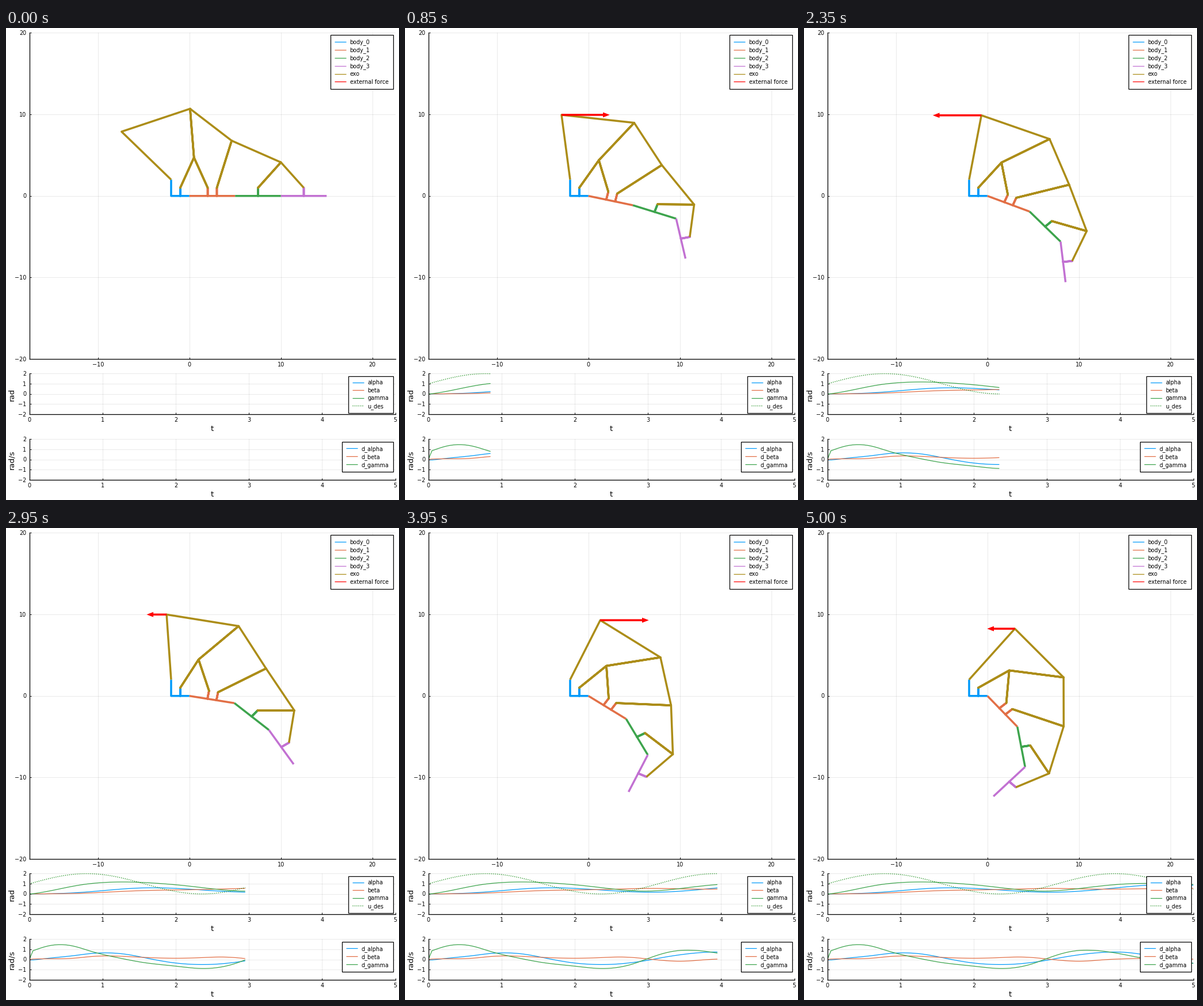
Write a matplotlib script that moves like this. It is 683 px wide and 820 px high and loops after 5.05 s.

```python
import numpy as np
import matplotlib.pyplot as plt
from matplotlib.animation import FuncAnimation
from matplotlib.patches import Polygon, Rectangle

W, H, DPI = 683, 820, 100
PT = 72 / DPI                     # points per pixel
BLUE, ORANGE, GREEN, PURPLE, GOLD = "#009afa", "#e26f46", "#3da44d", "#c271d2", "#ac8d18"
DOTS = (0, (1, 1.7))
THIN, THICK = 1.25 * PT, 3.5 * PT
STEP, COUNT = 0.05, 101
time = np.arange(COUNT) * STEP


# ---------- motion ----------

def spline(x, y, at):
    """Natural cubic spline through (x, y), evaluated at `at`."""
    x, y = np.asarray(x, float), np.asarray(y, float)
    n, h = len(x), np.diff(x)
    m, rhs = np.eye(n), np.zeros(n)
    for i in range(1, n - 1):
        m[i, i - 1:i + 2] = h[i - 1], 2 * (h[i - 1] + h[i]), h[i]
        rhs[i] = 6 * ((y[i + 1] - y[i]) / h[i] - (y[i] - y[i - 1]) / h[i - 1])
    k = np.linalg.solve(m, rhs)
    i = np.clip(np.searchsorted(x, at) - 1, 0, n - 2)
    a, b, w = x[i + 1] - at, at - x[i], h[i]
    return ((k[i] * a**3 + k[i + 1] * b**3) / (6 * w)
            + (y[i] / w - k[i] * w / 6) * a + (y[i + 1] / w - k[i + 1] * w / 6) * b)


knots = [.05, .25, .4, .6, .85, 1.05, 1.3, 1.55, 1.8, 2.05, 2.35,
         2.6, 2.8, 3, 3.2, 3.4, 3.55, 3.8, 4.05, 4.35, 4.7, 5]
rates = [
    [-.04, .12, .23, .38, .60, .66, .54, .22, -.13, -.38, -.49,
     -.43, -.28, -.07, .20, .43, .57, .72, .72, .45, -.03, -.37],
    [.05, .08, .08, .13, .30, .36, .31, .22, .15, .13, .19,
     .25, .20, .06, -.08, -.16, -.14, -.01, .07, .12, .10, .04],
    [.87, 1.33, 1.47, 1.33, .80, .43, .05, -.28, -.50, -.69, -.88,
     -.76, -.42, .10, .58, .87, .92, .80, .50, .10, -.16, -.37],
]
anchors = [0, .85, 1.55, 2.35, 3.55, 4.35, 5]
poses = [
    [0, .231, .593, .394, .328, .852, .857],
    [0, .104, .328, .435, .487, .515, .544],
    [0, 1.03, 1.131, .633, .629, 1.039, .934],
]


def trajectory(rate, pose):
    """Angular velocity, and its integral pulled onto the anchor poses."""
    vel = np.append(0, spline(knots, rate, time[1:]))
    ang = np.append(0, np.cumsum((vel[1:] + vel[:-1]) * STEP / 2))
    miss = np.array(pose) - np.interp(anchors, time, ang)
    return ang + spline(anchors, miss, time), vel


angles, speeds = map(np.array, zip(*(trajectory(r, p) for r, p in zip(rates, poses))))
drive = 1 + np.sin(2 * time)
force = 5 * np.sin(2 * time)


# ---------- linkage ----------

def apex(p, q, r):
    """Joint at distance r from both p and q, left of p->q."""
    d = q - p
    size = np.hypot(*d)
    up = np.array([-d[1], d[0]]) / size
    return (p + q) / 2 + up * np.sqrt(r * r - size * size / 4)


def bar(start, angle, stubs):
    """A bar of length 5 with unit stubs: path, stub segments, tips and end."""
    along = np.array([np.cos(angle), -np.sin(angle)])
    up = np.array([-along[1], along[0]])
    path, segs, tips = [start], [], []
    for s in stubs:
        foot = start + s * along
        tip = foot + up
        path += [foot, tip, foot]
        segs.append((foot, tip))
        tips.append(tip)
    end = start + 5 * along
    return path + [end], segs, tips, end


def linkage(a, b, c):
    """Paths and doubled segments of the four bodies and the exo, plus its top."""
    base = np.array([[-2, 2], [-2, 0], [-1, 0], [-1, 1], [-1, 0], [0, 0]], float)
    p1, s1, (t1, t2), end = bar(np.zeros(2), a, (2, 3))
    p2, s2, (t3,), end = bar(end, a + b, (2.5,))
    p3, s3, (t4,), end = bar(end, a + b + c, (2.5,))
    root, t0 = base[0], base[3]
    d = apex(t0, t1, 4)
    f = apex(t3, t4, 4)
    e = apex(t2, f, 6)
    top = apex(d, e, 6)
    head = apex(root, top, 8)
    exo = [root, head, top, d, t0, d, t1, d, top, e, t2, e, f, t3, f, t4]
    twice = [(top, d), (d, t0), (d, t1), (e, t2), (f, t3)]
    parts = [(base, [(base[2], t0)]), (p1, s1), (p2, s2), (p3, s3), (exo, twice)]
    return parts, head


# ---------- stage ----------

# the small excess keeps the pixel size from rounding down
fig = plt.figure(figsize=((W + .01) / DPI, (H + .01) / DPI), dpi=DPI, facecolor="white")
top_layer = fig.add_axes([0, 0, 1, 1], zorder=5)
top_layer.set(xlim=(0, W), ylim=(H, 0))
top_layer.axis("off")


def put(x, y, text, ha="left", size=9.6, **kw):
    top_layer.text(x, y, text, ha=ha, va=kw.pop("va", "baseline"),
                   fontsize=size * PT, family="DejaVu Sans", **kw)


def panel(left, right, top, bottom, xlim, ylim, xticks, yticks):
    ax = fig.add_axes([left / W, 1 - bottom / H, (right - left) / W, (bottom - top) / H])
    ax.set(xlim=xlim, ylim=ylim, xticks=xticks, yticks=yticks)
    ax.patch.set_visible(False)
    ax.set_axisbelow(True)
    ax.grid(color="black", alpha=.1, lw=.8 * PT)
    ax.tick_params(direction="in", length=3 * PT, width=PT,
                   labelbottom=False, labelleft=False)
    for side in ("top", "right"):
        ax.spines[side].set_visible(False)
    for side in ("left", "bottom"):
        ax.spines[side].set_linewidth(1.3 * PT)
    for v in xticks:
        x = left + (v - xlim[0]) / (xlim[1] - xlim[0]) * (right - left)
        put(x, bottom + 12.7, str(v).replace("-", "\u2212"), "center")
    for v in yticks:
        y = bottom - (v - ylim[0]) / (ylim[1] - ylim[0]) * (bottom - top)
        put(35.3, y + 3.6, str(v).replace("-", "\u2212"), "right")
    return ax


def legend(left, top, bottom, first, gap, entries):
    top_layer.add_patch(Rectangle((left, top), 672.5 - left, bottom - top,
                                  fc="white", ec="black", lw=1.25 * PT))
    for i, (name, color, style) in enumerate(entries):
        y = first + i * gap
        top_layer.plot([left + 7.8, left + 27], [y, y], color=color, ls=style, lw=THIN,
                       solid_capstyle="butt", dash_capstyle="butt")
        put(left + 34, y + 3.4, name)


XLIM, YLIM = (-17.5, 22.5), (-20, 20)
BOX = (40.5, 676.5, 8.5, 575)
scene = panel(*BOX, XLIM, YLIM, range(-10, 21, 10), range(-20, 21, 10))
pos_ax = panel(40.5, 676.5, 600.5, 671, (0, 5), (-2, 2), range(6), range(-2, 3))
vel_ax = panel(40.5, 676.5, 714.5, 785, (0, 5), (-2, 2), range(6), range(-2, 3))

for y, unit, mid in ((700, "rad", 636.5), (813.5, "rad/s", 750)):
    put(358.5, y, "t", "center", 13.2)
    put(10, mid, unit, "center", 13.2, va="center", rotation=90)

names = ["alpha", "beta", "gamma"]
hues = [BLUE, ORANGE, GREEN]
bodies = [BLUE, ORANGE, GREEN, PURPLE, GOLD]
legend(563.5, 12.3, 106, 24, 13.9,
       [(n, c, "-") for n, c in zip(["body_0", "body_1", "body_2", "body_3", "exo"], bodies)]
       + [("external force", "red", "-")])
legend(594.5, 605, 669, 616, 13.5,
       [(n, c, "-") for n, c in zip(names, hues)] + [("u_des", "green", DOTS)])
legend(583.5, 719, 771.5, 730.5, 14, [("d_" + n, c, "-") for n, c in zip(names, hues)])


def stroke(ax, color, width, style="-"):
    line, = ax.plot([], [], color=color, lw=width, ls=style, snap=False,
                    solid_capstyle="butt", dash_capstyle="butt", solid_joinstyle="round")
    return line


links = [(stroke(scene, c, THICK), stroke(scene, c, THICK)) for c in bodies]
shaft = stroke(scene, "red", THICK)
tip = Polygon(np.zeros((3, 2)), closed=True, fc="red", ec="red", lw=THICK,
              joinstyle="miter", zorder=3, snap=False)
scene.add_patch(tip)
UX = (XLIM[1] - XLIM[0]) / (BOX[1] - BOX[0])      # data units per pixel
UY = (YLIM[1] - YLIM[0]) / (BOX[3] - BOX[2])

curves = [(stroke(pos_ax, c, THIN), v) for c, v in zip(hues, angles)]
curves.append((stroke(pos_ax, "green", THIN, DOTS), drive))
curves += [(stroke(vel_ax, c, THIN), v) for c, v in zip(hues, speeds)]


def draw(i):
    parts, head = linkage(*angles[:, i])
    for (line, extra), (path, segs) in zip(links, parts):
        line.set_data(*np.transpose(path))
        gap = np.full(2, np.nan)
        extra.set_data(*np.transpose([p for s in segs for p in (*s, gap)]))

    end = head + [force[i], 0]
    way = np.sign(force[i])
    shaft.set_data([head[0], end[0]], [head[1], end[1]])
    tip.set_xy([end, end + [-5 * way * UX, 1.9 * UY], end + [-5 * way * UX, -1.9 * UY]])
    shaft.set_visible(i > 0)
    tip.set_visible(i > 0)

    for line, values in curves:
        line.set_data(time[:i + 1], values[:i + 1])
    return []


anim = FuncAnimation(fig, draw, frames=COUNT, interval=50, init_func=lambda: draw(0),
                     repeat=True, repeat_delay=0, blit=False)
plt.show()
```
